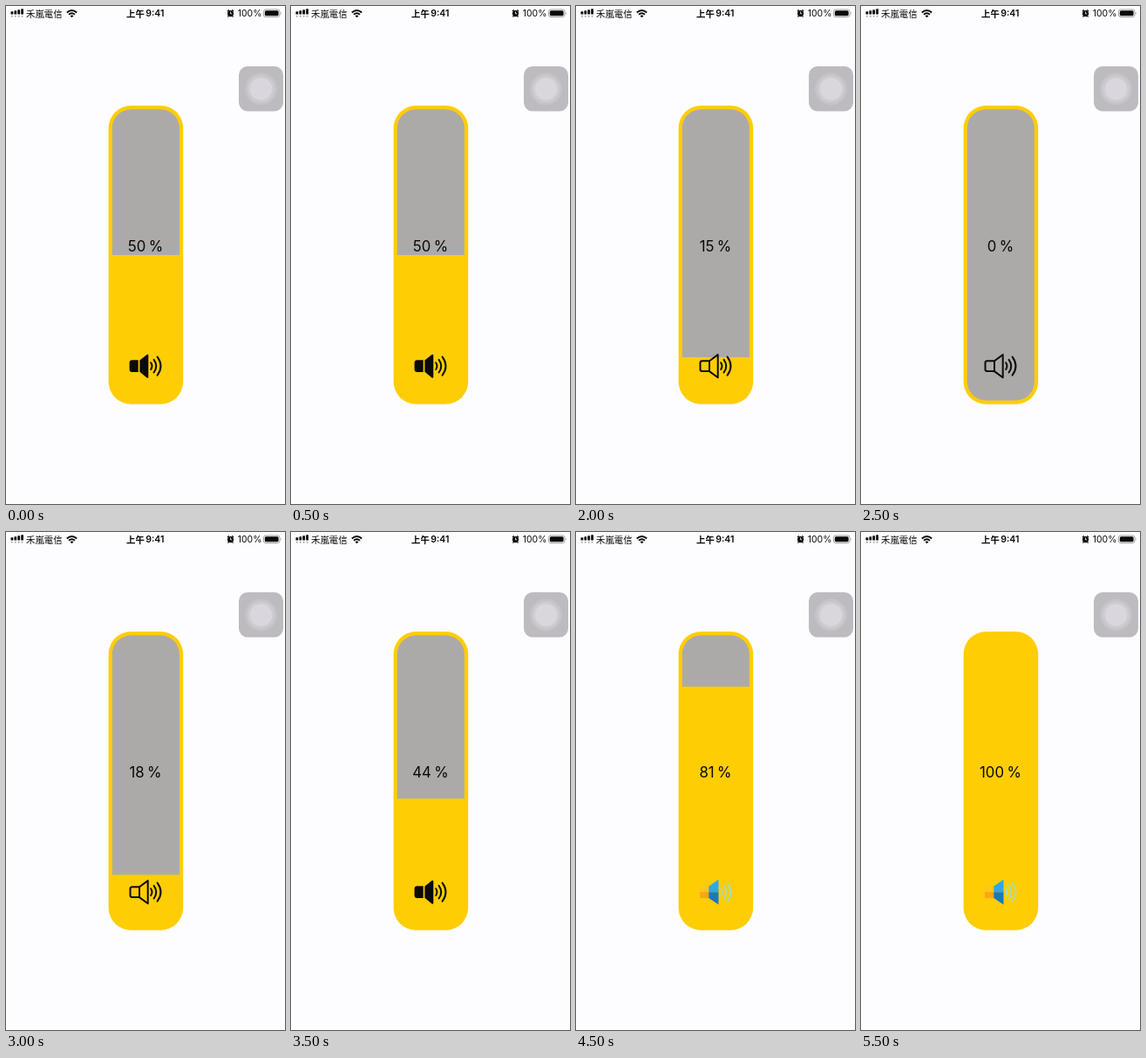
An HTML page that plays this animation: 320 by 570 pixels, repeating every 7000 ms.

```html
<!DOCTYPE html>
<html lang="zh-Hant">
<head>
<meta charset="utf-8">
<title>Volume slider</title>
<style>
html, body { margin: 0; width: 100%; height: 100%; overflow: hidden; background: #fdfdff; }
svg { display: block; width: 320px; height: 570px; }
text { font-family: Inter, "Noto Sans CJK TC", "Noto Sans CJK", sans-serif; fill: #080808; }
#label { font-size: 16.8px; word-spacing: -1.3px; text-anchor: middle; }
.wave { fill: none; stroke-width: 2; stroke-linecap: round; }
</style>
</head>
<body>
<svg viewBox="0 0 320 570">
  <defs>
    <clipPath id="track"><rect x="121.8" y="118.3" width="77.1" height="333.2" rx="21.5"/></clipPath>
    <g id="waves" class="wave">
      <path d="M166.2 408.2q2.6 3.9 0 7.8"/>
      <path d="M169.6 404.8q5.4 7.3 0 14.6"/>
      <path d="M173.6 401.6q7.8 10.5 0 21"/>
    </g>
  </defs>
  <rect width="320" height="570" fill="#fdfdff"/>

  <!-- status bar -->
  <g fill="#0a0a0a">
    <rect x="5.5" y="6.3" width="2.8" height="3.2" rx=".6"/>
    <rect x="9.4" y="5.3" width="2.8" height="4.2" rx=".6"/>
    <rect x="13.3" y="4.3" width="2.8" height="5.2" rx=".6"/>
    <rect x="17.2" y="3.3" width="2.8" height="6.2" rx=".6"/>
  </g>
  <path d="M6.9 11.8H20" stroke="#a3a3a6" stroke-width="1.9" stroke-dasharray="0 3.9" stroke-linecap="round"/>
  <text x="23" y="12.6" font-size="10.4">禾嵐電信</text>
  <g fill="none" stroke="#0a0a0a" stroke-width="1.9">
    <path d="M69.8 7.5q5.7-5 11.4 0"/>
    <path d="M72 9.8q3.5-3 7 0"/>
  </g>
  <path d="M73.5 11.2q2-1.6 4 0l-2 2z" fill="#0a0a0a"/>
  <text x="138" y="12.8" font-size="10.4" font-weight="600">上午</text>
  <text x="160.2" y="12.4" font-size="10.5" font-weight="600">9:41</text>
  <g stroke="#0a0a0a" fill="#0a0a0a" stroke-width="1.2" stroke-linecap="round">
    <circle cx="257.5" cy="8.6" r="3"/>
    <path d="M254.3 5.6l1-.9M260.7 5.6l-1-.9M255.3 11.6l-.5.6M259.7 11.6l.5.6"/>
    <path d="M257.5 6.8v2h1.5" fill="none" stroke="#fdfdff" stroke-width=".8"/>
  </g>
  <text x="265.8" y="12.4" font-size="10.4">100%</text>
  <rect x="295.4" y="4" width="18.6" height="8.6" rx="2.6" fill="none" stroke="#97979a" stroke-width=".9"/>
  <rect x="296.8" y="5.3" width="15.8" height="6" rx="1.5" fill="#0a0a0a"/>
  <path d="M315 6.8q1.5 1.5 0 3z" fill="#97979a"/>

  <!-- floating button -->
  <rect x="267" y="69" width="51" height="51.5" rx="10" fill="#bebbc0"/>
  <g fill="#d9d7dd">
    <circle cx="292.5" cy="95" r="18.5" fill="#c5c2c8"/>
    <circle cx="292.5" cy="95" r="15.8" fill="#cdcad1"/>
    <circle cx="292.5" cy="95" r="12.8"/>
  </g>

  <!-- slider -->
  <rect x="117.6" y="114" width="85.6" height="341.8" rx="25.8" fill="#ffcd03"/>
  <rect id="empty" x="117" y="114" width="87" height="171" fill="#acaaa9" clip-path="url(#track)"/>
  <text id="label" x="160" y="281">50 %</text>

  <g id="outline" stroke="#0b0b08" fill="none" stroke-width="2" stroke-linejoin="round">
    <path d="M153 406.3h-8.2q-2.3 0-2.3 2.3v7.2q0 2.3 2.3 2.3h8.2zl9.7-7.2v26.2l-9.7-7.2"/>
    <use href="#waves"/>
  </g>
  <g id="solid" stroke="#0b0b08" fill="#0b0b08">
    <path d="M151.7 405.3h-7.1q-3 0-3 3v7.8q0 3 3 3h7.1z" stroke="none"/>
    <path d="M153.4 405.6l8.2-6.6q1.7-1 1.7.9v24.6q0 1.9-1.7.9l-8.2-6.6z" stroke="none"/>
    <use href="#waves"/>
  </g>
  <g id="color" stroke="#a9dcb4">
    <path d="M142 405.3h10.5v7h-10.5z" fill="#ffc61a" stroke="none"/>
    <path d="M142 412.2h10.5v6.9h-10.5z" fill="#fba614" stroke="none"/>
    <path d="M152.3 405.4l11.2-7.6v14.4h-11.2z" fill="#2fa8e2" stroke="none"/>
    <path d="M152.3 412.2h11.2v14.4l-11.2-7.6z" fill="#1a78bd" stroke="none"/>
    <use href="#waves"/>
  </g>
</svg>
<script>
const LOOP = 7000, TOP = 114, BOTTOM = 456;
// [start in ms, level in percent]
const steps = [
  [0, 50], [1500, 43.2], [2000, 15.8], [2500, 0], [3000, 18.6],
  [3500, 44.1], [4000, 63.2], [4500, 81.6], [5000, 95.1], [5500, 100]
];
const byId = id => document.getElementById(id);
const icons = ['outline', 'solid', 'color'];

function show(level) {
  byId('empty').setAttribute('height', (BOTTOM - TOP) * (1 - level / 100));
  byId('label').textContent = Math.floor(level) + ' %';
  const active = level > 50 ? 'color' : level > 20 ? 'solid' : 'outline';
  for (const id of icons) byId(id).style.display = id === active ? '' : 'none';
}

const start = performance.now();
let shown;
function tick(now) {
  const time = Math.max(0, now - start) % LOOP;
  const level = steps.filter(([from]) => from <= time).pop()[1];
  if (level !== shown) show(shown = level);
  requestAnimationFrame(tick);
}
tick(start);
</script>
</body>
</html>
```
